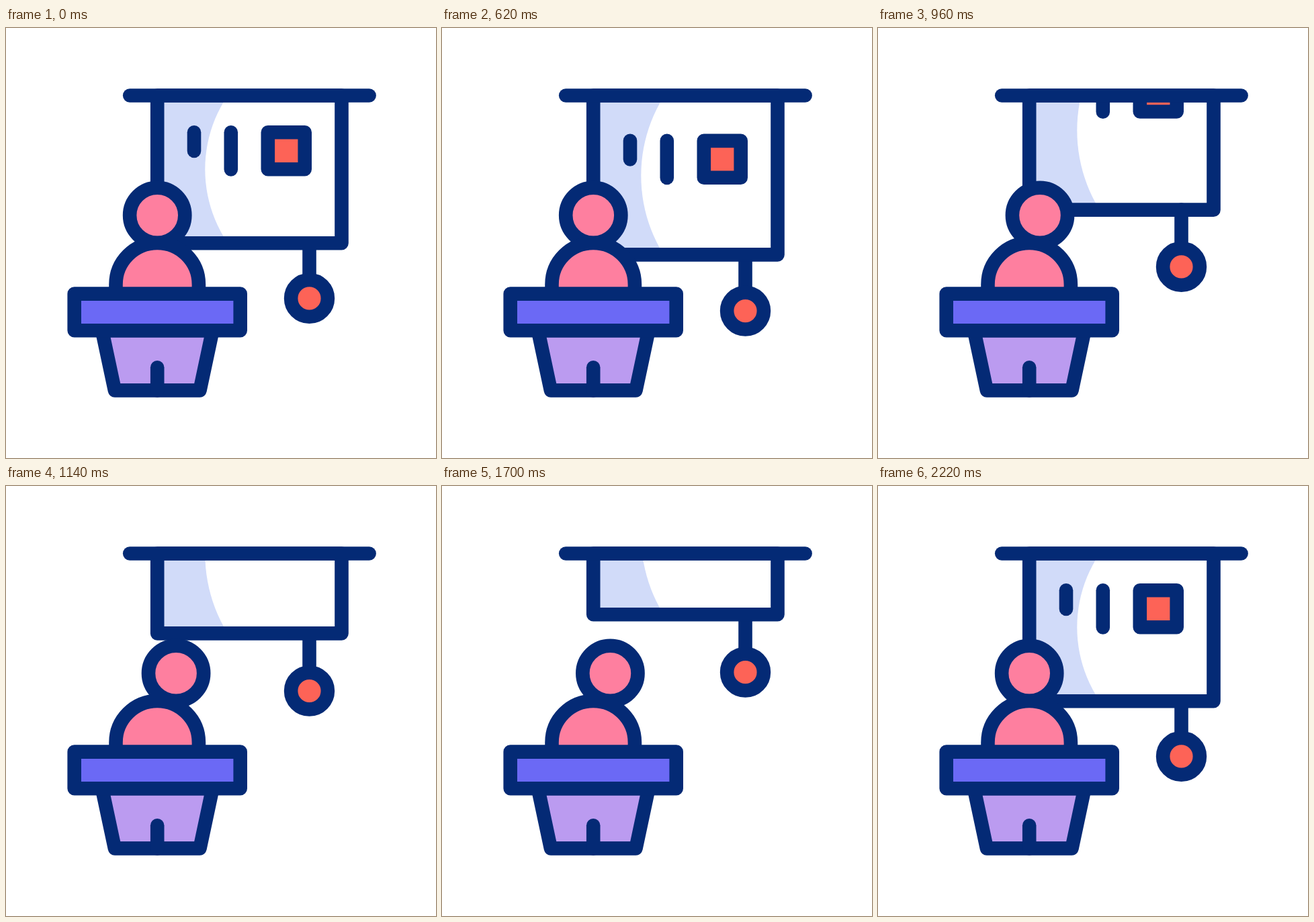
An HTML page with a canvas for the animation above (2400 ms loop, 640x640 px).

```html
<!DOCTYPE html>
<html lang="en">
<head>
<meta charset="utf-8">
<title>Presenter</title>
<style>
  html, body { margin: 0; width: 100%; height: 100%; overflow: hidden; background: #fff; }
  canvas { display: block; }
</style>
</head>
<body>
<canvas id="stage" width="640" height="640"></canvas>
<script>
const ctx = document.getElementById('stage').getContext('2d');
const LOOP = 2400;
const COLORS = {
  ink: '#042a75', shade: '#d1dbf9', red: '#fd6357',
  pink: '#fe7f9f', desk: '#6b69f5', base: '#bb9bf0'
};
const AXIS = 225.2;   // centre line of the speaker and the desk
const ROD_Y = 100.5;

// Piecewise smoothstep through [time, value] keys.
function track(keys, t) {
  if (t <= keys[0][0]) return keys[0][1];
  for (let i = 1; i < keys.length; i++) {
    const [t0, v0] = keys[i - 1], [t1, v1] = keys[i];
    if (t < t1) {
      const u = (t - t0) / (t1 - t0);
      return v0 + (v1 - v0) * u * u * (3 - 2 * u);
    }
  }
  return keys[keys.length - 1][1];
}

// Pulled down a little, rolled up, held, rolled down again.
const roll = (pull, rise, t) =>
  track([[400, 0], [600, pull], [1400, -rise], [1600, -rise], [2200, 0]], t);

const sway = t => track([[600, 0], [1400, 37], [2200, 0]], t);

function paint(fill) {
  if (fill) {
    ctx.fillStyle = fill;
    ctx.fill();
  }
  ctx.stroke();
}

function line(x0, y0, x1, y1) {
  ctx.beginPath();
  ctx.moveTo(x0, y0);
  ctx.lineTo(x1, y1);
  paint();
}

function box(x, y, w, h, fill) {
  ctx.beginPath();
  ctx.rect(x, y, w, h);
  paint(fill);
}

function disc(x, y, r, fill) {
  ctx.beginPath();
  ctx.arc(x, y, r, 0, 2 * Math.PI);
  paint(fill);
}

function drawScreen(t) {
  const left = AXIS, right = 499.5;
  const bottom = 320.2 + roll(17.5, 139.5, t);
  const shadeTop = ROD_Y + roll(2, 158, t);
  const icons = roll(13, 218, t);
  const ballY = 402.4 + roll(19, 135.5, t);

  ctx.save();
  ctx.beginPath();
  ctx.rect(left, ROD_Y, right - left, bottom - ROD_Y);
  ctx.clip();

  // Shaded side, bounded on the right by a concave arc.
  const radius = 196;
  const stretch = (bottom - shadeTop) / 219.7;
  ctx.fillStyle = COLORS.shade;
  ctx.fillRect(left, ROD_Y, 112, bottom - ROD_Y);
  ctx.fillStyle = '#fff';
  ctx.beginPath();
  ctx.ellipse(296.3 + radius, (shadeTop + bottom) / 2, radius, radius * stretch, 0, 0, 2 * Math.PI);
  ctx.fill();

  ctx.translate(0, icons);
  line(280, 155.3, 280, 183);
  line(334.8, 155.3, 334.8, 210.4);
  box(389.8, 155.3, 54.9, 54.9, COLORS.red);
  ctx.restore();

  line(451.5, bottom, 451.5, ballY - 27.4);
  disc(451.5, ballY, 27.4, COLORS.red);
  box(left, ROD_Y, right - left, bottom - ROD_Y);
  line(184.2, ROD_Y, 540.6, ROD_Y);
}

function drawSpeaker(t) {
  disc(AXIS + sway(t), 278.8, 41.1, COLORS.pink);
  ctx.beginPath();
  ctx.moveTo(AXIS - 61.7, 395.6);
  ctx.lineTo(AXIS - 61.7, 381.7);
  ctx.arc(AXIS, 381.7, 61.7, Math.PI, 0);
  ctx.lineTo(AXIS + 61.7, 395.6);
  paint(COLORS.pink);
}

function drawDesk() {
  ctx.beginPath();
  ctx.moveTo(AXIS - 82.3, 450.2);
  ctx.lineTo(AXIS - 63.3, 539.4);
  ctx.lineTo(AXIS + 63.3, 539.4);
  ctx.lineTo(AXIS + 82.3, 450.2);
  ctx.closePath();
  paint(COLORS.base);
  line(AXIS, 505.3, AXIS, 539.4);
  box(AXIS - 123.5, 395.6, 247, 54.6, COLORS.desk);
}

function draw(now) {
  const t = now % LOOP;
  ctx.fillStyle = '#fff';
  ctx.fillRect(0, 0, 640, 640);
  ctx.strokeStyle = COLORS.ink;
  ctx.lineWidth = 20.6;
  ctx.lineCap = ctx.lineJoin = 'round';
  drawScreen(t);
  drawSpeaker(t);
  drawDesk();
}

function tick() {
  draw(performance.now());
  requestAnimationFrame(tick);
}
tick();
</script>
</body>
</html>
```
